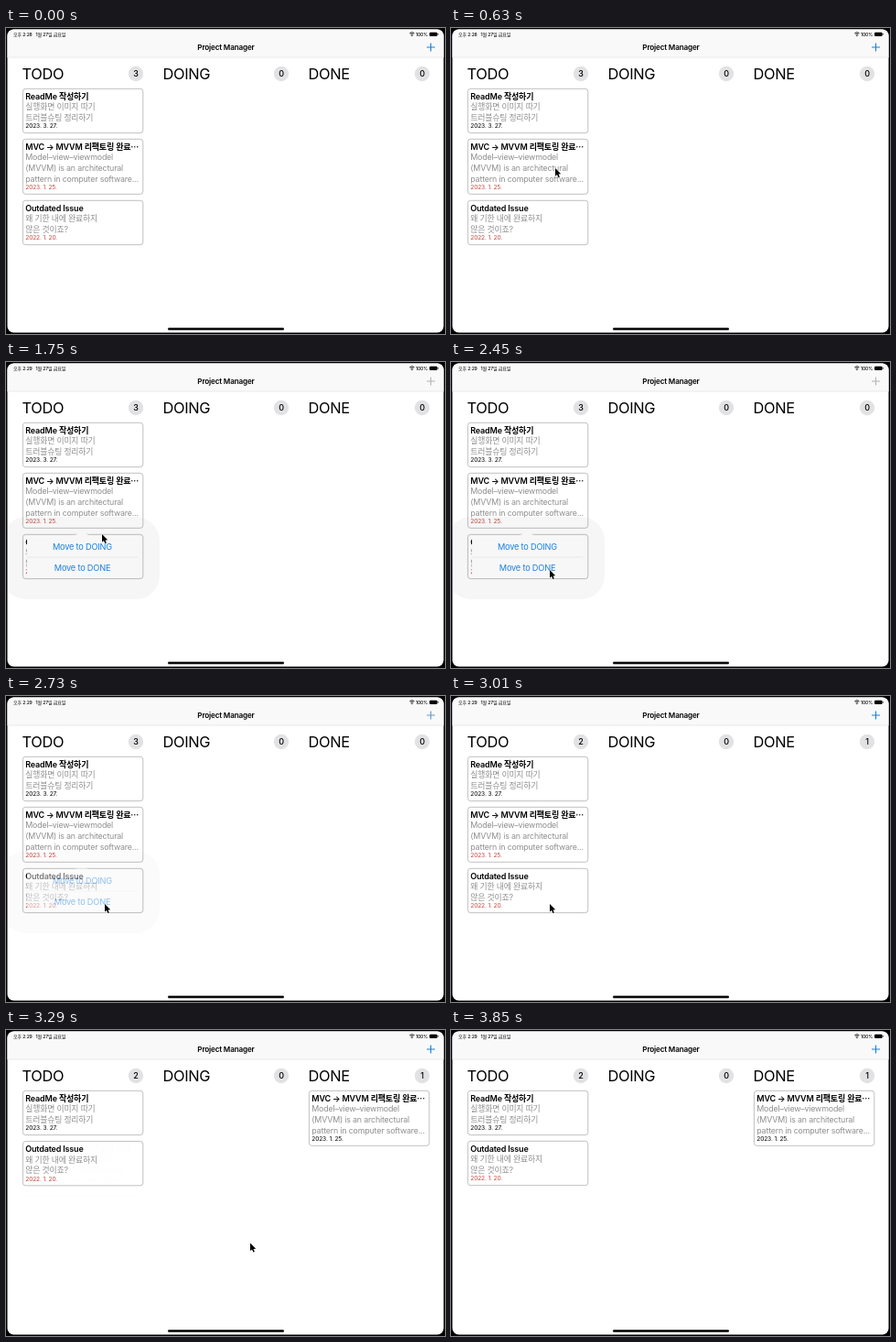
An HTML page for the animation above (4130 ms loop, 480 px wide and 334 px high).

```html
<!DOCTYPE html>
<html lang="ko">
<head>
<meta charset="utf-8">
<title>Project Manager</title>
<style>
  html, body { margin: 0; width: 100%; height: 100%; overflow: hidden; background: #000; }
  svg { display: block; width: 100%; height: 100%; }
  text {
    font-family: Inter, 'Noto Sans CJK KR', 'Noto Sans CJK', sans-serif;
    letter-spacing: -.02em;
  }
  .status { font-size: 5px; font-weight: 500; }
  .bar { font-size: 8.15px; font-weight: 600; }
  .heading { font-size: 16.4px; }
  .count { font-size: 9px; font-weight: 500; }
  .title { font-size: 9px; font-weight: 600; }
  .body { font-size: 8.85px; fill: #8e8e90; }
  .date { font-size: 6.6px; }
  .late { fill: #c0453c; }
  .action { font-size: 9.2px; fill: #1b7fdc; }
  .mid { text-anchor: middle; }
</style>
</head>
<body>
<svg id="stage" viewBox="0 0 480 334"></svg>
<script>
const LOOP = 4130, STEP = 70;
const stage = document.getElementById('stage');

const text = (x, y, cls, str, id = '') =>
  `<text x="${x}" y="${y}" class="${cls}"${id && ` id="${id}"`}>${str}</text>`;

const plus = color =>
  `<path d="M460 21h9M464.5 16.5v9" stroke="${color}" stroke-width="1.1"/>`;

const column = (x, countX, name, id) =>
  text(x, 55.8, 'heading', name) +
  `<circle cx="${countX}" cy="50" r="8.2" fill="#e2e2e4"/>` +
  text(countX, 53.2, 'count mid', '', id);

// A card is drawn at the origin; its group is placed by a transform.
function card(id, { title, body, date, late }) {
  const extra = (body.length - 2) * 11.7;
  return `<g id="${id}">
    <rect x="-1" y="-2" width="134" height="${52.5 + extra}" fill="#fff"/>
    <rect x=".4" y=".3" width="131.4" height="${48.3 + extra}" rx="3" fill="#fff" stroke="#a6a6a6" stroke-width=".7"/>
    ${text(3.3, 12, 'title', title)}
    ${body.map((line, i) => text(3.3, 23.4 + i * 11.6, 'body', line)).join('')}
    ${text(3.3, 43.4 + extra, late ? 'date late' : 'date', date)}
  </g>`;
}

const refactor = {
  title: 'MVC → MVVM 리팩토링 완료⋯',
  body: ['Model–view–viewmodel', '(MVVM) is an architectural', 'pattern in computer software...'],
  date: '2023. 1. 25.'
};

stage.innerHTML = `
  <defs><clipPath id="screen"><rect x="1.5" y="1.5" width="477" height="331" rx="7"/></clipPath></defs>
  <rect width="480" height="334" fill="#000"/>
  <g clip-path="url(#screen)">
    <rect width="480" height="334" fill="#fff"/>
    <rect width="480" height="32" fill="#f9f9f9"/>
    <path d="M0 32h480" stroke="#dedede" stroke-width=".6"/>
    ${text(8, 8.9, 'status', '', 'clock')}
    ${text(32.5, 8.9, 'status', '1월 27일 금요일')}
    <path d="M441.3 5.8q2.6-2.2 5.2 0M442.4 7.1q1.5-1.2 3 0" fill="none" stroke="#000" stroke-width=".9"/>
    <circle cx="443.9" cy="8.4" r=".7"/>
    ${text(448, 8.7, 'status', '100%')}
    <rect x="463" y="4.7" width="8.6" height="4.2" rx="1.2"/>
    <path d="M472.4 6v1.6" stroke="#000" stroke-width=".7"/>
    ${text(240.5, 24.2, 'bar mid', 'Project Manager')}
    ${plus('#1f80d2')}
    ${column(17.5, 142, 'TODO', 'todo')}
    ${column(171.5, 301, 'DOING', 'doing')}
    ${column(330.5, 455, 'DONE', 'done')}
    ${card('readme', { title: 'ReadMe 작성하기', body: ['실행화면 이미지 따기', '트러블슈팅 정리하기'], date: '2023. 3. 27.' })}
    ${card('outdated', { title: 'Outdated Issue', body: ['왜 기한 내에 완료하지', '않은 것이죠?'], date: '2022. 1. 20.', late: true })}
    ${card('leaving', { ...refactor, late: true })}
    ${card('arriving', refactor)}
    <g id="popover">
      ${'<rect x="460" y="16" width="9.5" height="10" fill="#f9f9f9"/>' + plus('#b4b4b6')}
      <rect x="-4" y="169" width="172" height="90" rx="26" fill="#000" opacity=".035"/>
      <path d="M23 192q0-3 3-3H75q3 0 5-3q3-4 6 0q2 3 5 3H141q3 0 3 3V233q0 3-3 3H26q-3 0-3-3z" fill="#f7f7f8"/>
      <path d="M23 213h121" stroke="#dcdcde" stroke-width=".6"/>
      ${text(83.5, 204.8, 'action mid', 'Move to DOING')}
      ${text(83.5, 228, 'action mid', 'Move to DONE')}
    </g>
    <rect x="177" y="327.3" width="127" height="2.5" rx="1.2"/>
    <path id="cursor" d="M0 0V8.6L2 6.9 3.4 10.1 4.9 9.4 3.5 6.4 6.2 6.2z" stroke="#fff" stroke-width=".7" paint-order="stroke"/>
  </g>`;

const el = id => document.getElementById(id);
const clamp = v => Math.min(1, Math.max(0, v));
const progress = (t, from, to) => {
  const p = clamp((t - from) / (to - from));
  return p * p * (3 - 2 * p);
};
const place = (id, x, y) => el(id).setAttribute('transform', `translate(${x} ${y})`);
const fade = (id, opacity) => el(id).setAttribute('opacity', opacity);

// Pointer tip: time, x, y
const pointer = [
  [140, 213, 317], [280, 184, 266], [420, 146, 200], [560, 118, 158], [630, 114, 153],
  [1400, 114, 153], [1750, 105, 188], [2030, 84, 211], [2310, 107, 226], [2450, 108, 227],
  [3010, 108, 227], [3080, 146, 227], [3150, 228, 227], [3220, 258, 231], [3360, 276, 234],
  [3430, 276, 234], [3500, 272, 250], [3570, 259, 283], [3640, 243, 311],
  [3710, 243, 311], [3780, 243, 317]
];

function pointerAt(t) {
  const i = pointer.findIndex(key => key[0] >= t);
  if (i <= 0) return pointer[0].slice(1);
  const [t0, x0, y0] = pointer[i - 1], [t1, x1, y1] = pointer[i];
  const p = (t - t0) / (t1 - t0);
  return [x0 + (x1 - x0) * p, y0 + (y1 - y0) * p];
}

function draw(t) {
  const moved = t >= 3010;
  const shift = progress(t, 3010, 3300);

  el('clock').textContent = t < 1260 ? '오후 2:28' : '오후 2:29';
  el('todo').textContent = moved ? 2 : 3;
  el('doing').textContent = 0;
  el('done').textContent = moved ? 1 : 0;

  place('readme', 18, 66);
  place('leaving', 18, 121);
  place('outdated', 18, 188 - 67 * shift);
  place('arriving', 331, 66);
  fade('leaving', 1 - shift);
  fade('arriving', shift);
  fade('popover', progress(t, 1190, 1540) * (1 - progress(t, 2520, 2940)));

  const visible = t >= 140 && t < 3850;
  fade('cursor', visible ? 1 : 0);
  if (visible) place('cursor', ...pointerAt(t));
}

function tick() {
  const t = performance.now() % LOOP;
  draw(Math.floor(t / STEP) * STEP);
  requestAnimationFrame(tick);
}
tick();
</script>
</body>
</html>
```
